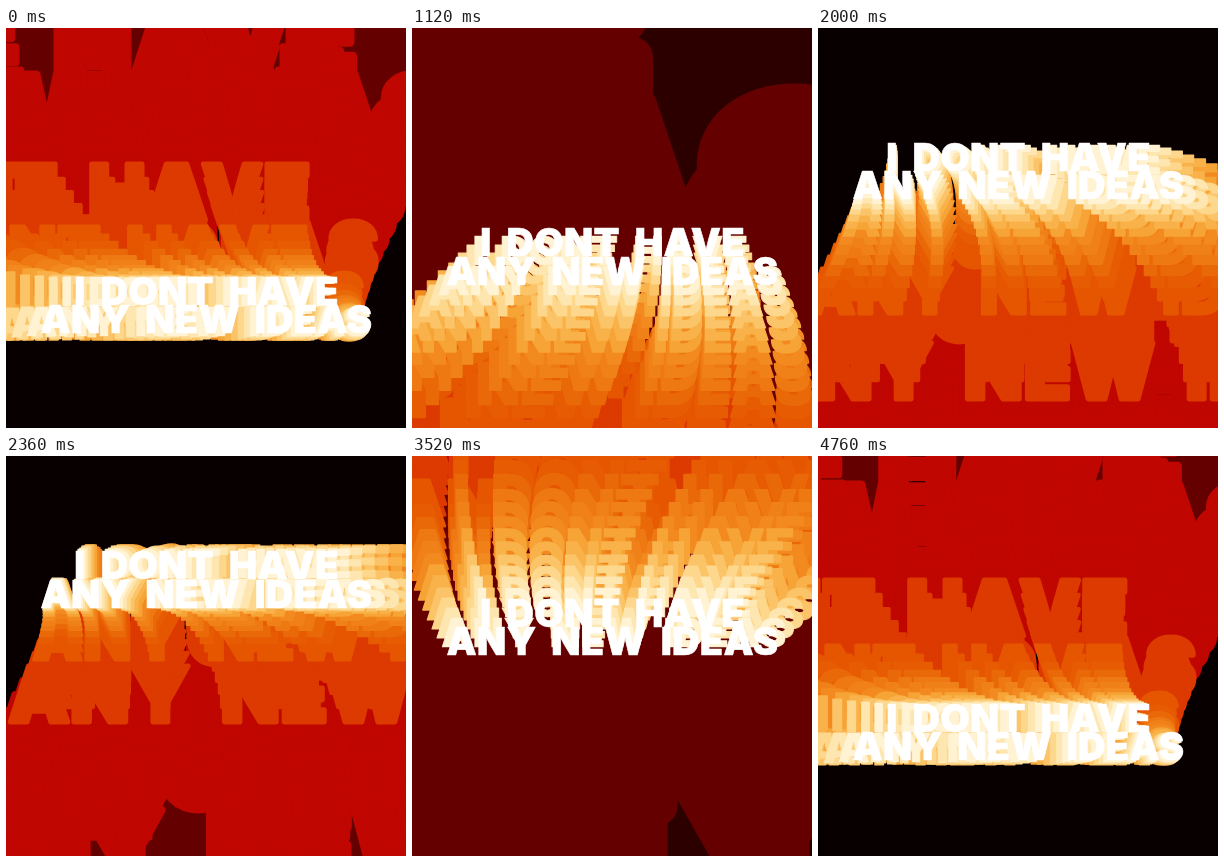
These frames come from a looping animation (400x400 px, 4800 ms). An HTML page with a canvas:

```html
<!DOCTYPE html>
<html lang="en">
<head>
<meta charset="utf-8">
<title>I dont have any new ideas</title>
<style>
  html, body { margin: 0; width: 100%; height: 100%; overflow: hidden; background: #000; }
  canvas { display: block; }
</style>
</head>
<body>
<canvas id="stage" width="400" height="400"></canvas>
<script>
const ctx = document.getElementById('stage').getContext('2d');
const FRAME_MS = 40, FRAMES = 120, ZOOM = 1.04, MAX_AGE = 84;

// Cooling colours: [last age in frames, colour]
const HEAT = [
  [0, '#fff'], [1, '#fff3d4'], [2, '#fee6b0'], [3, '#fdd78c'], [4, '#fbc468'],
  [5, '#f9b24a'], [6, '#f6a436'], [7, '#f28a20'], [8, '#f08018'], [9, '#ee7812'],
  [10, '#e96808'], [11, '#e75c02'], [13, '#e65600'], [18, '#dc3a00'],
  [26, '#c00600'], [50, '#650000'], [64, '#2d0000'], [MAX_AGE, '#080000']
];
const heatAt = age => HEAT.find(([last]) => age <= last)[1];

const phase = frame => (frame - 5) / FRAMES * 2 * Math.PI;
const textY = frame => 200 + 80 * Math.cos(phase(frame));

// The point every echo is zoomed away from
function zoomCentre(frame) {
  const a = phase(frame) + 0.15;
  return { x: 210 + 190 * Math.cos(a), y: 205 - 105 * Math.sin(a) };
}

// Accumulated zoom for the text printed at each past frame, oldest first
function echoes(frame) {
  const list = [];
  let scale = 1, x = 0, y = 0;
  for (let age = 0; age <= MAX_AGE; age++) {
    list.push({ age, scale, x, y });
    const c = zoomCentre(frame - age);
    x -= scale * (ZOOM - 1) * c.x;
    y -= scale * (ZOOM - 1) * c.y;
    scale *= ZOOM;
  }
  return list.reverse();
}

function drawLine(text, y) {
  ctx.fillText(text, 200.5, y);
  ctx.strokeText(text, 200.5, y);
}

function draw(frame) {
  ctx.setTransform(1, 0, 0, 1, 0, 0);
  ctx.fillStyle = '#000';
  ctx.fillRect(0, 0, 400, 400);
  ctx.font = '900 38px Inter, sans-serif';
  ctx.wordSpacing = '7px';
  ctx.letterSpacing = '0.3px';
  ctx.textAlign = 'center';
  ctx.lineJoin = 'round';
  for (const { age, scale, x, y } of echoes(frame)) {
    const baseY = textY(frame - age);
    ctx.setTransform(scale, 0, 0, scale, x, y);
    ctx.fillStyle = ctx.strokeStyle = heatAt(age);
    ctx.lineWidth = 0.6 + age / 10; // echoes blur wider as they age
    drawLine('I DONT HAVE', baseY - 0.5);
    drawLine('ANY NEW IDEAS', baseY + 28);
  }
}

let shown = -1;
function tick() {
  const frame = Math.floor(performance.now() / FRAME_MS) % FRAMES;
  if (frame !== shown) draw(shown = frame);
  requestAnimationFrame(tick);
}
tick();
</script>
</body>
</html>
```
